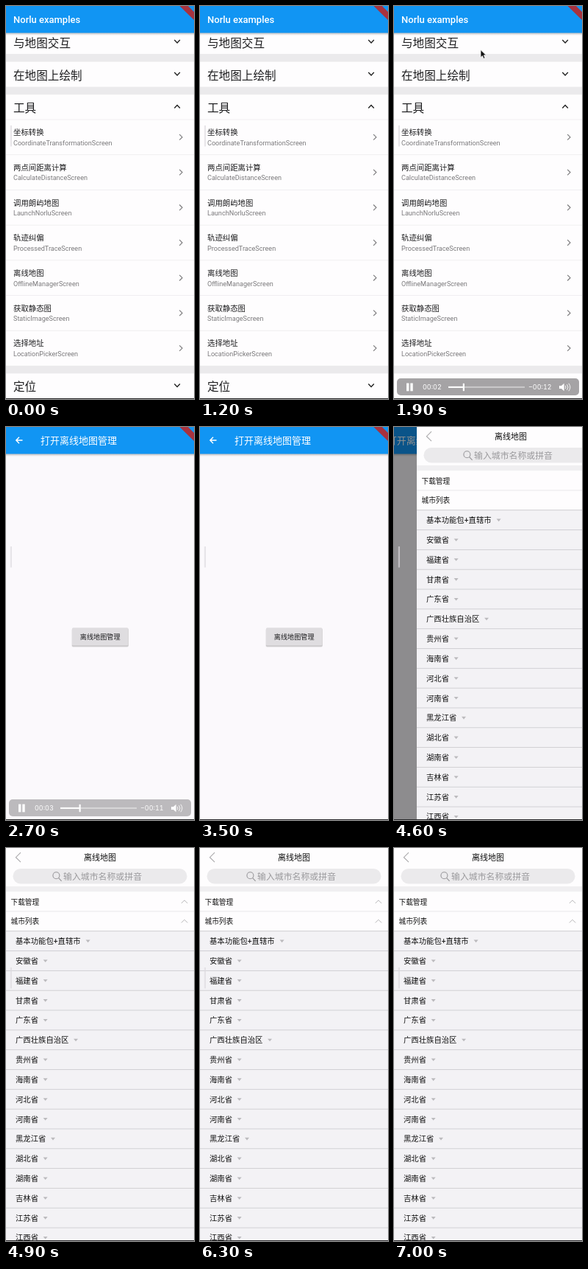
An HTML page that plays this animation: 256x533 px, repeating every 8000 ms.

```html
<!DOCTYPE html>
<html lang="zh-CN">
<head>
<meta charset="utf-8">
<title>Offline map demo</title>
<style>
html, body { margin: 0; width: 100%; height: 100%; overflow: hidden; background: #fff; }
svg { display: block; width: 100vw; height: 100vh; }
text { font-family: Roboto, "Noto Sans CJK SC", "Noto Sans CJK", sans-serif; }
#bar text { font-family: Inter, sans-serif; font-feature-settings: "tnum"; }
</style>
</head>
<body>
<svg id="stage" viewBox="0 0 256 533" preserveAspectRatio="none"></svg>
<script>
const W = 256, H = 533, LOOP = 8000, FRAME = 100;

// --- drawing helpers ---
const rect = (x, y, w, h, fill, extra = '') =>
  `<rect x="${x}" y="${y}" width="${w}" height="${h}" fill="${fill}" ${extra}/>`;
const text = (x, cy, size, str, fill = '#1d1d1f', extra = '') =>
  `<text x="${x}" y="${(cy + size * 0.38).toFixed(2)}" font-size="${size}" fill="${fill}" ${extra}>${str}</text>`;
const line = (d, stroke, width, extra = '') =>
  `<path d="${d}" fill="none" stroke="${stroke}" stroke-width="${width}" ${extra}/>`;
const shape = (d, fill, extra = '') => `<path d="${d}" fill="${fill}" ${extra}/>`;
const group = (id, body) => `<g id="${id}">${body}</g>`;

const appBar = content =>
  rect(0, 36, W, 4, 'url(#shade)') +
  rect(0, 0, W, 36.5, '#1195f3') +
  shape('M236.5 0H248L256 8V19Z', '#a8323e') +
  content;

// --- first page: list of examples ---
function listPage() {
  const items = [
    ['坐标转换', 'CoordinateTransformationScreen'],
    ['两点间距离计算', 'CalculateDistanceScreen'],
    ['调用朗屿地图', 'LaunchNorluScreen'],
    ['轨迹纠偏', 'ProcessedTraceScreen'],
    ['离线地图', 'OfflineManagerScreen'],
    ['获取静态图', 'StaticImageScreen'],
    ['选择地址', 'LocationPickerScreen']
  ];
  const heads = [['与地图交互', 50], ['在地图上绘制', 94], ['工具', 138.5, true], ['定位', 516.5]];
  let s = rect(0, 0, W, H, '#fefdfe');
  for (const y of [65, 109.6, 487.8]) s += rect(0, y, W, 10.6, '#ebeaec');
  for (const [name, y, open] of heads) {
    const dy = open ? -3.8 : 3.8;
    s += text(10, y, 15.6, name);
    s += line(`M229.3 ${y - 2 - dy / 2}l3.8 ${dy}l3.8 ${-dy}`, '#222', 1.4);
  }
  items.forEach(([name, screen], i) => {
    const y = 171.3 + i * 47.7;
    s += rect(0, y - 17.6, W, 0.7, '#ebe9ec');
    s += text(10, y, 10.4, name);
    s += text(10, y + 14, 9.1, screen, '#7b7a7c');
    s += line(`M236.2 ${y + 2.8}l3.8 3.8l-3.8 3.8`, '#7d7c7e', 1.2);
  });
  return s + appBar(text(10, 18, 13, 'Norlu examples', '#fff', 'font-weight="500"'));
}

// --- second page: one button ---
function buttonPage() {
  return rect(0, 0, W, H, '#fbf9fc') +
    rect(89.5, 273.4, 77.5, 25, '#000', 'rx="2" opacity=".1"') +
    rect(90, 273, 76.5, 24.6, '#000', 'rx="1.5" opacity=".16"') +
    rect(90, 272.3, 76.5, 24.2, '#dfdde0', 'rx="1.5"') +
    text(128.2, 285, 9.15, '离线地图管理', '#1d1d1f', 'text-anchor="middle"') +
    appBar(
      line('M22.5 18H14M18 13.8L13.8 18L18 22.2', '#fff', 1.4) +
      text(47, 18.5, 13, '打开离线地图管理', '#fff', 'font-weight="500"'));
}

// --- third page: offline city list ---
function cityPage() {
  const names = ['基本功能包+直辖市', '安徽省', '福建省', '甘肃省', '广东省', '广西壮族自治区',
    '贵州省', '海南省', '河北省', '河南省', '黑龙江省', '湖北省', '湖南省', '吉林省', '江苏省', '江西省'];
  let s = rect(0, 0, W, H, '#fefdfe') +
    line('M20 6.2L13.4 12.7L20 19.2', '#a9a8ab', 1.1) +
    text(128, 13, 11, '离线地图', '#111', 'text-anchor="middle"') +
    rect(9.5, 28, 237, 20.6, '#ebeaec', 'rx="10.3"') +
    `<circle cx="68.4" cy="37.3" r="4.5" fill="none" stroke="#98979a" stroke-width="1.1"/>` +
    line('M71.6 40.6L75.6 44.8', '#98979a', 1.2) +
    text(78, 38.5, 11.9, '输入城市名称或拼音', '#9b9a9d') +
    rect(0, 52, W, 7.2, '#f0eff1');
  [['下载管理', 73], ['城市列表', 99.4]].forEach(([name, y]) => {
    s += text(6.5, y, 9.7, name, '#111');
    s += line(`M238.8 ${y + 2}l4.2 -4.2l4.2 4.2`, '#b0afb2', 0.9);
    s += rect(0, y + 12.6, W, 0.7, '#dedde0');
  });
  s += rect(0, 112.4, W, H, '#f3f2f5');
  names.forEach((name, i) => {
    const y = 126.2 + i * 26.82;
    const units = name.length - (name.includes('+') ? 0.4 : 0);
    const x = 13 + units * 10.35 + 6.6;
    s += rect(0, y - 13.9, W, 0.9, '#cecdd1');
    s += text(13, y, 10.35, name, '#111');
    s += shape(`M${x} ${y - 1.6}h6l-3 3.6z`, '#bbbabd');
  });
  return s;
}

// --- player bar ---
function playerBar() {
  const white = '#fff';
  return rect(4, 505, 248, 23, '#a5a3a5', 'rx="5"') +
    rect(17, 511.5, 3.4, 10.8, white) + rect(22.3, 511.5, 3.4, 10.8, white) +
    text(39, 517, 9, '', white, 'id="elapsed"') +
    text(183, 517, 9, '', white, 'id="remain"') +
    rect(74, 515.9, 104, 2, white, 'opacity=".42"') +
    rect(74, 515.9, 1, 2, white, 'id="played"') +
    rect(0, 511.8, 2.2, 10.4, white, 'id="knob" rx=".8"') +
    shape('M225 515h3l3.6 -3.2v10.4l-3.6 -3.2h-3z', white) +
    line('M233.2 514.8q1.6 2.2 0 4.4M235.5 513.2q3 3.8 0 7.6M237.8 511.8q4.2 5.2 0 10.4', white, 0.9);
}

const $ = id => document.getElementById(id);
$('stage').innerHTML =
  '<defs><linearGradient id="shade" x2="0" y2="1"><stop stop-opacity=".26"/>' +
  '<stop offset="1" stop-opacity="0"/></linearGradient></defs>' +
  group('list', listPage()) +
  group('button', buttonPage()) +
  rect(0, 0, W, H, '#000', 'id="dim"') +
  group('city', cityPage()) +
  rect(5.8, 162, 2.2, 28.5, '#dddbdf', 'opacity=".65"') +
  group('bar', playerBar()) +
  group('cursor', shape('M0 0V10.2L2.4 8L4 11.8L5.9 11L4.3 7.3H7.4Z', '#111', 'stroke="#fff" stroke-width=".7"')) +
  rect(0, 532, W, 1, '#2a2a2c');

const ramp = (t, a, b) => Math.min(1, Math.max(0, (t - a) / (b - a)));
const smooth = u => u * u * (3 - 2 * u);
const show = (id, alpha) => {
  $(id).setAttribute('opacity', alpha.toFixed(3));
  $(id).style.display = alpha > 0 ? '' : 'none';
};
const move = (id, x, y = 0) =>
  $(id).setAttribute('transform', `translate(${x.toFixed(2)} ${y.toFixed(2)})`);
const clock = sec => '00:' + String(sec).padStart(2, '0');

function draw(time) {
  const t = Math.floor((time % LOOP) / FRAME) * FRAME;

  show('button', smooth(ramp(t, 2150, 2450)));

  // city page pushes in from the right, the page below drifts a quarter as far
  const push = 1 - Math.exp(-Math.pow(Math.max(0, t - 4370) / 164, 2.21));
  move('city', W * (1 - push));
  move('button', -W / 4 * push);
  show('dim', push > 0 ? 0.01 + 0.49 * push : 0);
  show('city', push > 0 ? 1 : 0);

  show('bar', ramp(t, 1200, 1500) * (1 - ramp(t, 2600, 2960)));
  const sec = t / 1000 + 1;
  const x = 74 + sec * 7.2;
  $('elapsed').textContent = clock(Math.floor(sec));
  $('remain').textContent = '−' + clock(Math.max(0, 14 - Math.floor(sec)));
  $('played').setAttribute('width', x - 74);
  $('knob').setAttribute('x', x - 1.1);

  const enter = smooth(ramp(t, 1200, 1800));
  const leave = smooth(ramp(t, 1900, 2400));
  move('cursor', 118, -14 + 73.5 * (enter - leave));
  show('cursor', t >= 1200 && t < 2400 ? 1 : 0);
}

let start = null;
function tick(now) {
  if (start === null) start = now;
  draw(now - start);
  requestAnimationFrame(tick);
}
draw(0);
requestAnimationFrame(tick);
</script>
</body>
</html>
```
